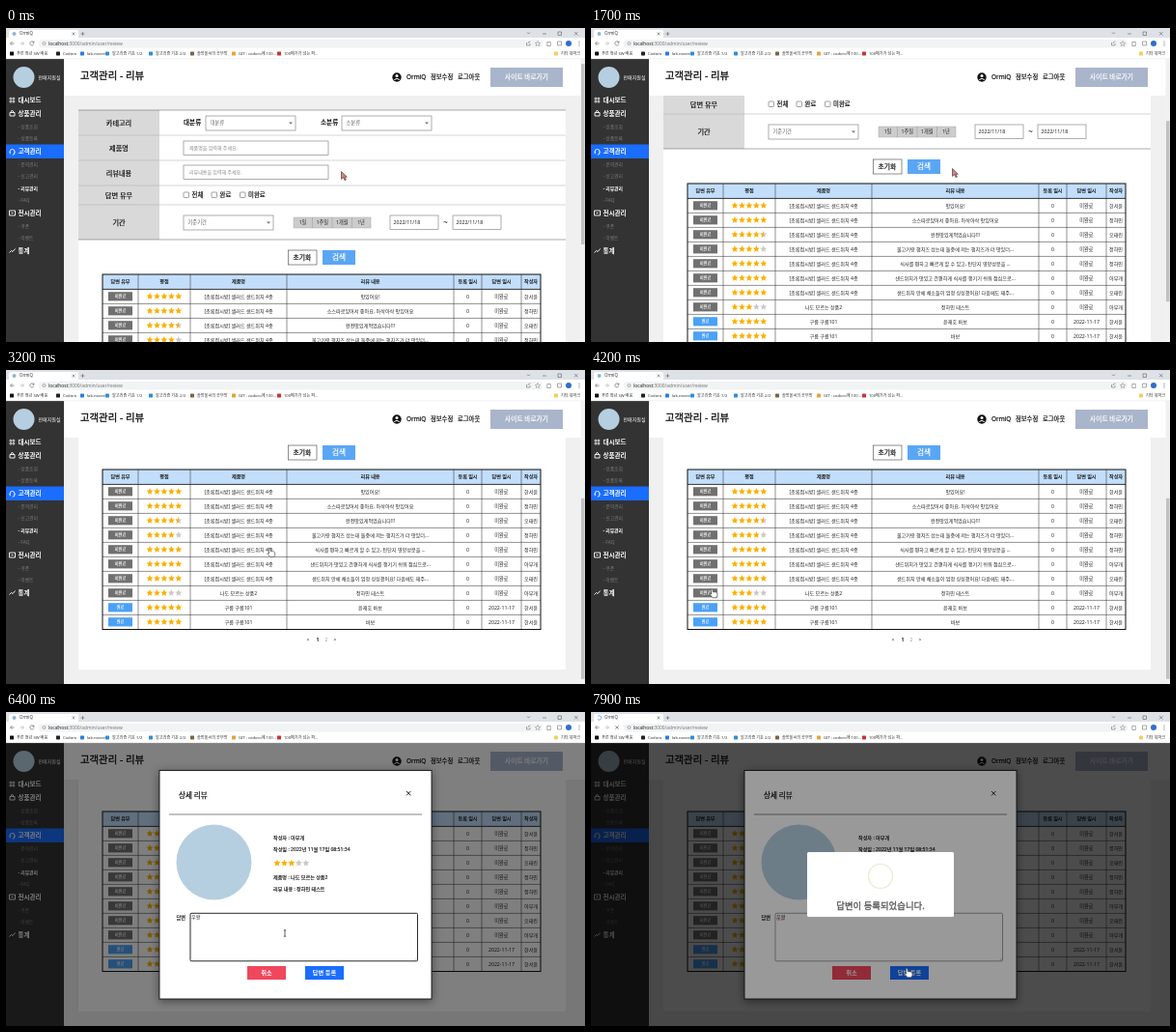
Recreate the animation shown at these times as an HTML page. Size 600 px wide and 325 px high, loop 8 s.

```html
<!DOCTYPE html>
<html lang="ko">
<head>
<meta charset="utf-8">
<title>Review admin</title>
<style>
html, body { margin: 0; width: 100%; height: 100%; overflow: hidden; background: #fff; }
svg { display: block; font-family: "Noto Sans", "Noto Sans CJK KR", sans-serif; white-space: pre; }
#modal > rect:first-child { filter: drop-shadow(0 2px 5px rgba(0, 0, 0, .45)); }
</style>
</head>
<body>
<svg id="stage" width="600" height="325" viewBox="0 0 600 325"></svg>
<script>
const LOOP = 8000, STEP = 100;
// Medium weight is regular with a hairline outline
const text = (s, x, y, size, fill = '#222', anchor = 'start', weight = 400) =>
  `<text x="${x}" y="${y + size * .36}" font-size="${size}" fill="${fill}" text-anchor="${anchor}" ` +
  (weight === 500 ? `stroke="${fill}" stroke-width="${size * .03}"` : `font-weight="${weight}"`) + `>${s}</text>`;
const mid = (s, x, y, size, fill, weight) => text(s, x, y, size, fill, 'middle', weight);
const medium = (s, x, y, size) => text(s, x, y, size, '#111', 'start', 500);
const rect = (x, y, w, h, fill, stroke = 'none', sw = .6, r = 0) =>
  `<rect x="${x}" y="${y}" width="${w}" height="${h}" fill="${fill}" stroke="${stroke}" stroke-width="${sw}" rx="${r}"/>`;
const path = (d, stroke = '#222', sw = .6, fill = 'none') =>
  `<path d="${d}" fill="${fill}" stroke="${stroke}" stroke-width="${sw}"/>`;
const dot = (x, y, r, fill, extra = '') => `<circle cx="${x}" cy="${y}" r="${r}" fill="${fill}" ${extra}/>`;
const group = (id, body) => `<g id="${id}">${body}</g>`;
const each = (list, fn) => list.map(fn).join('');

// Star outline from point a to point b of ten, clockwise from the top
function star(x, y, fill, a = 0, b = 9) {
  let pts = '';
  for (let k = a; k <= b; k++) {
    const r = k % 2 ? 1.7 : 3.7, q = k * Math.PI / 5;
    pts += `${x + r * Math.sin(q)},${y - r * Math.cos(q)} `;
  }
  return `<polygon points="${pts}" fill="${fill}"/>`;
}
const rating = (n, x, y) => each([0, 1, 2, 3, 4], i => {
  const left = n - i, sx = x + i * 7.45;
  return star(sx, y, left >= 1 ? '#faaf00' : '#c9c9c9') + (left === .5 ? star(sx, y, '#faaf00', 5, 10) : '');
});

function browser() {
  const marks = [
    [6, '#111', '푸른 청년 SW 배움'], [54, '#222', 'Codoro'], [79, '#2b7de0', 'lab.novee'],
    [105, '#2f8fd8', '알고리즘 기초 1/2'], [150, '#2f8fd8', '알고리즘 기초 2/2'],
    [193, '#7a6548', '솔방울씨의 공부방'], [236, '#e8a33c', 'GIT : codoro에 100...'],
    [283, '#c33', '100메가가 넘는 파...'], [570, '#f3cf62', '기타 북마크']];
  return rect(0, 0, 600, 32, '#fff') + rect(0, 0, 600, 10, '#dee1e6') + rect(3, 2, 72, 9, '#fff', 'none', 0, 2) +
    group('favicon', dot(8.5, 6, 2, '#8fb4cf')) +
    group('spinner', path('M8.5 3.8a2.2 2.2 0 1 1-2.2 2.2', '#5580d0', .7)) +
    text('OrmiQ', 14, 5.6, 4.4, '#333') +
    path('M68.5 4.5l3 3m0-3l-3 3M77.5 6h4m-2-2v4M540 4.5l1.5 1.5l1.5-1.5M556 6h4M572 4h3.5v3.5h-3.5zM589 4l3.5 3.5m0-3.5l-3.5 3.5', '#444', .5) +
    rect(34, 12, 522, 8.5, '#f1f3f4', 'none', 0, 4) +
    path('M8.5 16H4.5m2-2l-2 2l2 2', '#555') + path('M14.5 16h4m-2-2l2 2l-2 2', '#aaa') +
    group('reload', path('M28.8 15a2.1 2.1 0 1 0 .1 1.6M29 13.6v1.6h-1.6', '#555')) +
    group('stop', path('M25.3 14.3l3.4 3.4m0-3.4l-3.4 3.4', '#555')) +
    dot(39.5, 16, 1.5, 'none', 'stroke="#666" stroke-width=".5"') +
    text('localhost:<tspan fill="#777">3000/admin/user/review</tspan>', 44, 16, 4.8, '#222') +
    path('M539.5 15v3h3.5v-2M541 16q0-2 2.5-2M560.8 18.5v-4h3.5v4zM571.5 14h4v4h-4z', '#555', .5) +
    path('M551 13.6l.8 1.7l1.8.2l-1.3 1.2l.3 1.8l-1.6-.9l-1.6.9l.3-1.8l-1.3-1.2l1.8-.2z', '#666', .4) +
    dot(583, 16, 3, '#2f6fc9') + each([14, 16, 18], y => dot(594, y, .5, '#444')) +
    each(marks, ([x, c, s]) => rect(x - 2, 24.4, 4, 4, c, 'none', 0, .6) + text(s, x + 5, 26.4, 4.15, '#333')) +
    path('M0 31.8H600', '#ddd', .4);
}

function sidebar() {
  const top = [['대시보드', 74.5], ['상품관리', 88.5], ['고객관리', 128], ['전시관리', 191.5], ['통계', 230.5]];
  const sub = [['상품조회', 102], ['상품등록', 114], ['문의관리', 141], ['신고관리', 153.5], ['리뷰관리', 166], ['FAQ', 178.5], ['쿠폰', 205], ['이벤트', 217]];
  return rect(0, 32, 60, 293, '#333') + dot(18.5, 51, 11, '#b5cfe0') + text('판매지원실', 33.5, 51, 5, '#fff') +
    rect(0, 120.5, 60, 14.5, '#1a6dff') +
    each(top, ([s, y]) => text(s, 12.5, y, 6.5, '#fff', 'start', 700)) +
    each(sub, ([s, y]) => text('- ' + s, 12.5, y, 4.8, ...(y === 166 ? ['#fff', 'start', 700] : ['#7c7c7c']))) +
    path('M4 72.3h1.7v1.7H4zM7 72.3h1.7v1.7H7zM4 75.3h1.7v1.7H4zM7 75.3h1.7v1.7H7z', '#fff', .7) +
    path('M4 87.5h5v3.5H4zM5 87l1.4-2l1.4 2', '#fff', .9) +
    path('M4 129v-1a2.5 2.5 0 0 1 5 0v1M4.2 128.3v2M8.8 128.3v2l-2 1', '#fff', .9) +
    path('M3.5 189h6v5h-6zM5.5 191.5h2', '#fff', .9) + path('M3.5 232.5l2-2l1.5 1l2.5-3', '#fff', .9);
}

const header = () => rect(60, 32, 540, 38, '#fff') + medium('고객관리 - 리뷰', 77, 48.8, 10.4) +
  dot(405, 51, 4.7, '#111') + dot(405, 49.5, 1.5, '#fff') + path('M402.3 53.6q2.7-2.6 5.4 0', '#fff', 1) +
  medium('OrmiQ', 415, 51, 6.4) + medium('정보수정', 440, 51, 6.3) + medium('로그아웃', 468, 51, 6.3) +
  rect(502, 41, 75, 20, '#a9b5cb') + mid('사이트 바로가기', 539.5, 51, 6.7, '#fff', 500);

function form() {
  const lines = [85, 111, 137, 163, 183, 219];
  const select = (x, y, s) => rect(x, y, 93, 15, '#fff', '#777') + text(s, x + 4.5, y + 7.5, 5.3, '#666') +
    path(`M${x + 86} ${y + 6.6}h4l-2 2.2z`, 'none', 0, '#777');
  const input = (y, s) => rect(184, y, 150, 14.5, '#fff', '#777') + text(s, 190, y + 7.3, 5, '#888');
  const date = x => rect(x, 194, 50, 14.5, '#fff', '#777') + text('2022/11/18', x + 3.5, 201, 5.2, '#222');
  return rect(75, 85, 84, 134, '#d9d9d9') + each(lines, y => path(`M75 ${y}H580`, y === 85 || y === 219 ? '#555' : '#aaa', .5)) +
    each(['카테고리', '제품명', '리뷰내용', '답변 유무', '기간'], (s, i) => mid(s, 117, (lines[i] + lines[i + 1]) / 2, 7.2, '#111', 500)) +
    text('대분류', 184, 98, 6.6, '#111', 'start', 700) + select(207, 91, '대분류') +
    text('소분류', 326, 98, 6.6, '#111', 'start', 700) + select(348, 91, '소분류') +
    input(117, '제품명을 입력해 주세요.') + input(142, '리뷰내용을 입력해 주세요.') +
    each([[184, '전체'], [213, '완료'], [242.5, '미완료']], ([x, s]) => rect(x, 170, 5.5, 5.5, '#fff', '#666', .6, .8) + medium(s, x + 8.5, 173, 6.4)) +
    select(184, 194, '기준기간') + rect(298, 196, 80, 11, '#ccc', '#aaa', .5) + path('M317.5 196v11M338 196v11M358.5 196v11', '#999', .5) +
    each([[307.5, '1일'], [327.7, '1주일'], [348.2, '1개월'], [368, '1년']], ([x, s]) => mid(s, x, 201.5, 5.2)) +
    date(398) + mid('~', 455.5, 201, 8) + date(463) +
    rect(292.5, 230, 29.5, 15, '#fff', '#444') + mid('초기화', 307, 237.5, 6.8, '#111', 500) +
    rect(328, 230, 34, 15, '#5aa6f5') + mid('검색', 345, 237.5, 7.6, '#fff', 500);
}

function table() {
  const cols = [100, 137, 191, 291, 464, 493, 534, 554], top = 255;
  const at = i => (cols[i] + cols[i + 1]) / 2;
  const wich = '[초록접시방] 샐러드 샌드위치 4종', cloud = '구름 구름101';
  const who = ['한서윤', '정하민', '오태린', '아무개'];
  const rows = [
    [5, wich, '맛있어요!', 0], [5, wich, '소스따로있어서 좋아요. 아삭아삭 맛있어요', 1],
    [4.5, wich, '완전맛있게먹었습니다!!!', 2], [4, wich, '불고기랑 햄치즈 샀는데 둘중에 저는 햄치즈가 더 맛있더...', 1],
    [5, wich, '식사를 편하고 빠르게 할 수 있고, 탄단지 영양성분을 ...', 1],
    [5, wich, '샌드위치가 맛있고 간편하게 식사를 챙기기 쉬워 점심으로...', 3],
    [5, wich, '샌드위치 안에 채소들이 엄청 싱싱했어요! 다음에도 재주...', 2],
    [3, '나도 모르는 상품2', '정하민 테스트', 3], [5, cloud, '윤재호 바보', 0], [5, cloud, '바보', 0]];
  return rect(100, top, 454, 15.5, '#c2defb') +
    each(['답변 유무', '평점', '제품명', '리뷰 내용', '등록 일시', '답변 일시', '작성자'], (s, i) => mid(s, at(i), top + 7.5, 5.1, '#111', 500)) +
    each(rows, ([stars, item, note, name], i) => {
      const y = 277.8 + i * 15, done = i > 7;
      return path(`M100 ${y - 7.4}H554`, '#222', i ? .5 : .9) +
        rect(106, y - 4.6, 25, 9.2, done ? '#4ba1f5' : '#707070') + mid(done ? '완료' : '미완료', 118.5, y, 4.2, '#fff', 500) +
        rating(stars, 149, y) + mid(item, at(2), y, 5.1) + mid(note, at(3), y, 5.1) + mid('0', at(4), y, 5.2) +
        mid(done ? '2022-11-17' : '미완료', at(5), y, 5.2) + mid(who[name], at(6), y, 5.1);
    }) +
    each(cols.slice(1, -1), x => path(`M${x} ${top}V420.5`, '#222', .5)) + rect(100, top, 454, 165.5, 'none', '#111', 1) +
    mid('&lt;', 313, 431, 5) + mid('1', 323, 431, 5, '#111', 700) + mid('2', 332, 431, 5, '#999') + mid('&gt;', 341, 431, 5);
}

function modal() {
  return rect(159, 60.5, 282, 236.5, '#fff', '#111', .9) + medium('상세 리뷰', 179, 86, 7.5) +
    path('M415 82l4.4 4.4m0-4.4l-4.4 4.4', '#111', .9) + path('M169 106H431', '#333', .6) + dot(215.5, 155.5, 39, '#b5cfe0') +
    medium('작성자 : 아무개', 277, 130, 5.1) + medium('작성일 : 2022년 11월 17일 08:51:34', 277, 142, 5.1) + rating(3, 281, 156.5) +
    medium('제품명 : 나도 모르는 상품2', 277, 171, 5.1) + medium('리뷰 내용 : 정하민 테스트', 277, 183, 5.1) +
    medium('답변', 176.5, 213, 5.2) +
    `<rect id="area" x="191" y="208.3" width="235.5" height="49.5" rx="1" fill="#fff"/>` + path('M423.5 257l2-2M425 257l.7-.7', '#777', .4) +
    `<text id="reply" x="192" y="213.9" font-size="5.1" fill="#222"></text>` +
    group('squiggle', path('M192 215q.6-1 1.2 0t1.2 0t1.2 0t1.2 0t1.2 0t1.2 0t1.2 0', '#e33', .5)) +
    rect(250, 263, 40, 14, '#f0475c') + mid('취소', 270, 270, 6.2, '#fff', 700) +
    rect(310, 263, 40, 14, '#1a6dff') + mid('답변 등록', 330, 270, 6.2, '#fff', 700);
}

const alertBox = () => rect(-80, -35.2, 160, 70.4, '#fff', 'none', 0, 1.6) +
  dot(0, -9, 13.2, 'none', 'stroke="#ebead5" stroke-width="1.3"') + mid('답변이 등록되었습니다.', 0, 23, 9.9, '#545454', 500);

const cursors = group('arrow', path('M-2.5-4.5v8l2-1.8l1.6 3l1.3-.7l-1.5-2.8h2.4z', '#4a2020', .6, '#c98a86')) +
  group('hand', path('M-2.8-4.2q1-1 1.6.3l.7 2.7q3.7-.5 4.4 1.2l.1 2.3l-1 2.4h-4l-3-3.6q.3-1.3 1.9 0z', '#333', .6, '#fff')) +
  group('beam', path('M-1.2-3.2h2.4M0-3.2v6.4M-1.2 3.2h2.4', '#222', .7));

document.getElementById('stage').innerHTML =
  rect(0, 32, 600, 293, '#f0f0f0') + group('page', rect(75, 85, 505, 377, '#fff') + form() + table()) +
  header() + sidebar() +
  group('scrollbar', rect(595.5, 32, 4.5, 293, '#f1f1f1') + group('thumb', rect(596, 37, 3.5, 187, '#c1c1c1'))) +
  group('shade', rect(0, 32, 600, 293, '#000')) + group('modal', modal()) +
  group('shade2', rect(0, 32, 600, 293, '#000')) + group('alert', alertBox()) + browser() + group('pointer', cursors);

// Values at time t, linear between the given [time, ...values] keys
function along(keys, t) {
  const n = keys.findIndex(k => k[0] > t);
  if (n < 0) return keys.at(-1).slice(1);
  if (!n) return keys[0].slice(1);
  const a = keys[n - 1], b = keys[n], p = (t - a[0]) / (b[0] - a[0]);
  return a.slice(1).map((v, i) => v + (b[i + 1] - v) * p);
}
const scrollKeys = [[1100, 0], [1200, 22], [1300, 45], [1500, 80], [1700, 94], [2400, 94], [2500, 125], [2600, 147], [2700, 152]];
const pointerKeys = [[0, 350, 153], [600, 377, 150], [2400, 377, 150], [2600, 357, 148], [2800, 357, 148], [3700, 172, 240],
  [3900, 127, 231], [4300, 127, 231], [4400, 124, 229], [5000, 283, 229], [5300, 285, 229], [5400, 289, 229], [6800, 289, 229], [7300, 329, 270]];
const openAt = 7660;
const popKeys = [[0, .7], [135, 1.05], [240, .95], [300, 1]];
const typed = ['', 'ㅇ', '우', '웅', '우오', '우와', '우왕'];

const el = id => document.getElementById(id);
const set = (id, name, value) => el(id).setAttribute(name, value);
const show = (id, on) => set(id, 'opacity', +on);

function draw(t) {
  const [scroll] = along(scrollKeys, t), [x, y] = along(pointerKeys, t);
  set('page', 'transform', `translate(0 ${-scroll})`);
  set('thumb', 'transform', `translate(0 ${scroll * .63})`);

  const open = t >= 4300;
  show('modal', open);
  show('scrollbar', !open);
  show('shade', along([[4200, 0], [4400, .5]], t));
  const focused = t >= 5300 && t < 7300;
  set('area', 'stroke', focused ? '#111' : '#777');
  set('area', 'stroke-width', focused ? .9 : .7);
  el('reply').textContent = typed[Math.max(0, Math.min(6, Math.floor((t - 5800) / 100)))];
  show('squiggle', t >= 7300);

  const loading = t >= 7400;
  show('favicon', !loading);
  show('reload', !loading);
  show('spinner', loading);
  show('stop', loading);
  set('spinner', 'transform', `rotate(${t * .36} 8.5 6)`);

  const since = t - openAt;
  show('shade2', along([[0, 0], [100, .4]], since));
  show('alert', since >= 0);
  set('alert', 'transform', `translate(300 178.5) scale(${along(popKeys, since)})`);

  set('pointer', 'transform', `translate(${x} ${y})`);
  const beam = t >= 5000 && t < 7000, hand = (t >= 2500 && t < 4400) || t >= 7200;
  show('beam', beam);
  show('hand', hand);
  show('arrow', !beam && !hand);
}

const start = performance.now();
function tick() {
  const t = (performance.now() - start) % LOOP;
  draw(Math.floor(t / STEP) * STEP);
  requestAnimationFrame(tick);
}
tick();
</script>
</body>
</html>
```
